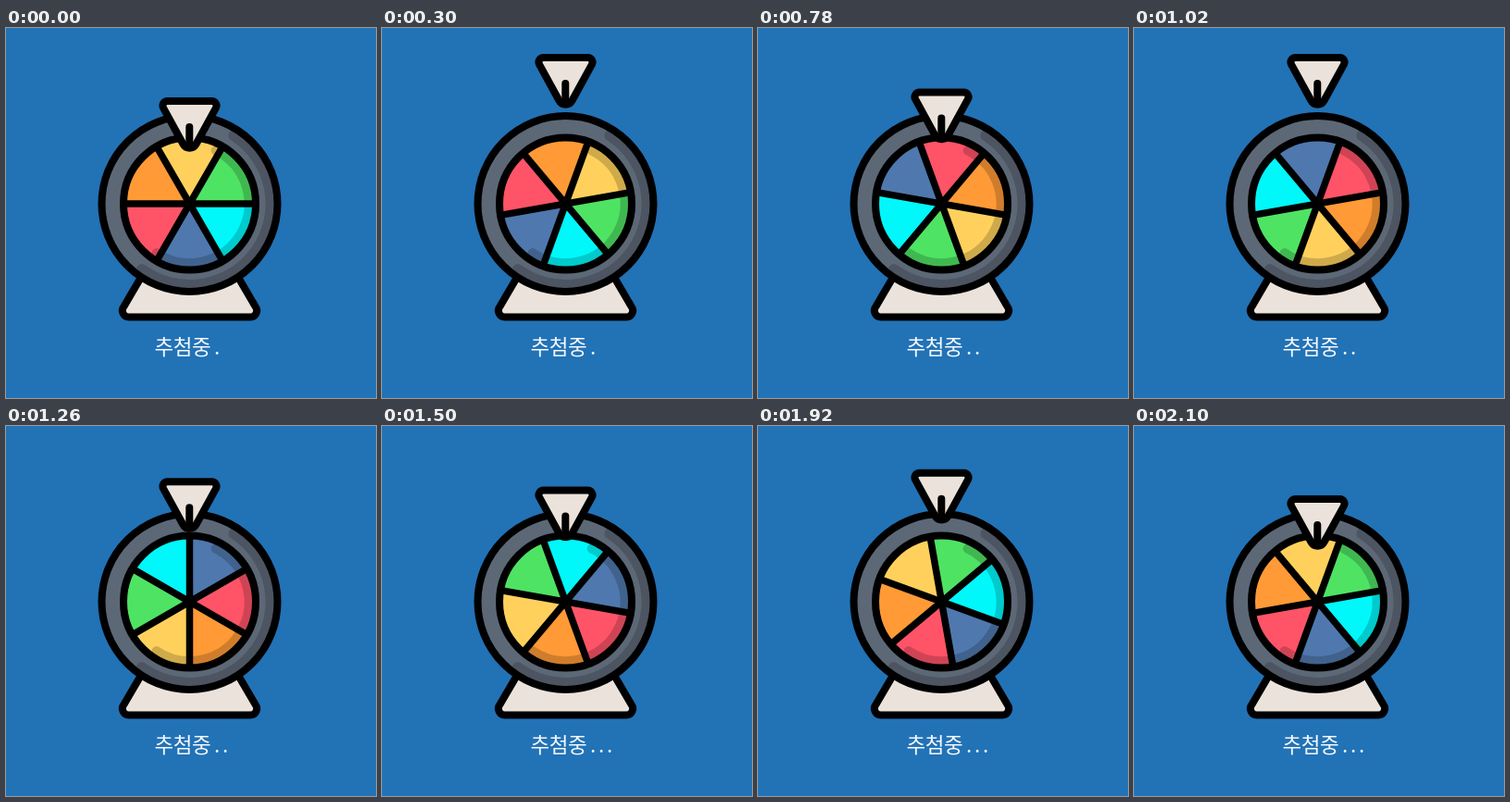
An HTML page that plays this animation: 400 by 400 pixels, repeating every 2160 ms.

```html
<!DOCTYPE html>
<html lang="ko">
<head>
<meta charset="utf-8">
<style>
  html, body { margin: 0; height: 100%; overflow: hidden; background: #2272b6; }
  svg { display: block; width: 100%; height: 100%; }
  .line { stroke: #000; stroke-width: 8; stroke-linejoin: round; stroke-linecap: round; }
  .cream { fill: #ebe3db; }
  .shade { fill: none; stroke: #000; stroke-opacity: .19; stroke-linecap: round; }
  text { font: 400 22.5px "Noto Sans CJK KR", "Noto Sans CJK", sans-serif; fill: #f4f8fc; }
</style>
</head>
<body>
<svg viewBox="0 0 400 400">
  <path class="line cream" d="M148 266L127.5 301a7 7 0 0 0 6 11.5H263.5a7 7 0 0 0 6-11.5L249 266z"/>
  <g transform="translate(198.5 190)">
    <circle r="95" fill="#5d6877"/>
    <path id="rimShade" class="shade" stroke-width="12"/>
    <circle class="line" r="95" fill="none"/>
    <g id="slices"></g>
    <path id="wheelShade" class="shade" stroke-width="10"/>
    <g id="spokes"></g>
    <circle class="line" r="71.5" fill="none"/>
  </g>
  <g id="pointer">
    <path class="line cream" d="M174.5 79h48a5 5 0 0 1 4.3 7.6L205.5 125.5a8 8 0 0 1-14 0L170.2 86.6a5 5 0 0 1 4.3-7.6z"/>
    <path class="line" d="M198.3 107V126"/>
  </g>
  <text x="160.5" y="353" letter-spacing="-.5">추첨중</text>
  <text id="dots" x="225" y="353" letter-spacing="2.7"></text>
</svg>
<script>
const STEP = 60, STEPS = 36, CYCLE = 12;
const colors = ['#ffd15c', '#4fe364', '#00f8fb', '#4f78ae', '#ff5468', '#ff9a36'];
const $ = id => document.getElementById(id);

// Point on a circle, in degrees clockwise from the right
const at = (r, deg) => {
  const a = deg * Math.PI / 180;
  return `${(r * Math.cos(a)).toFixed(2)} ${(r * Math.sin(a)).toFixed(2)}`;
};
const arc = (r, from, to) =>
  `M${at(r, from)}A${r} ${r} 0 ${to - from > 180 ? 1 : 0} 1 ${at(r, to)}`;

$('slices').innerHTML = colors.map((c, i) =>
  `<path fill="${c}" d="${arc(71, i * 60 - 120, i * 60 - 60)}L0 0z"/>`).join('');
$('spokes').innerHTML = [0, 60, 120].map(d =>
  `<path class="line" style="stroke-width:7.5" d="M${at(70, d)}L${at(70, d + 180)}"/>`).join('');
$('rimShade').setAttribute('d', arc(88, -57, 126));
$('wheelShade').setAttribute('d', arc(64, -64, 124));

function draw(now) {
  const n = Math.floor(now / STEP) % STEPS;
  const k = n % CYCLE;
  const turn = `rotate(${n * 360 / STEPS})`;
  $('slices').setAttribute('transform', turn);
  $('spokes').setAttribute('transform', turn);
  $('pointer').setAttribute('transform', `translate(0 ${-9.4 * Math.min(k, CYCLE - 1 - k)})`);
  $('dots').textContent = '.'.repeat(1 + Math.floor(n / CYCLE));
}

const start = performance.now();
function tick() {
  draw(performance.now() - start);
  requestAnimationFrame(tick);
}
tick();
</script>
</body>
</html>
```
